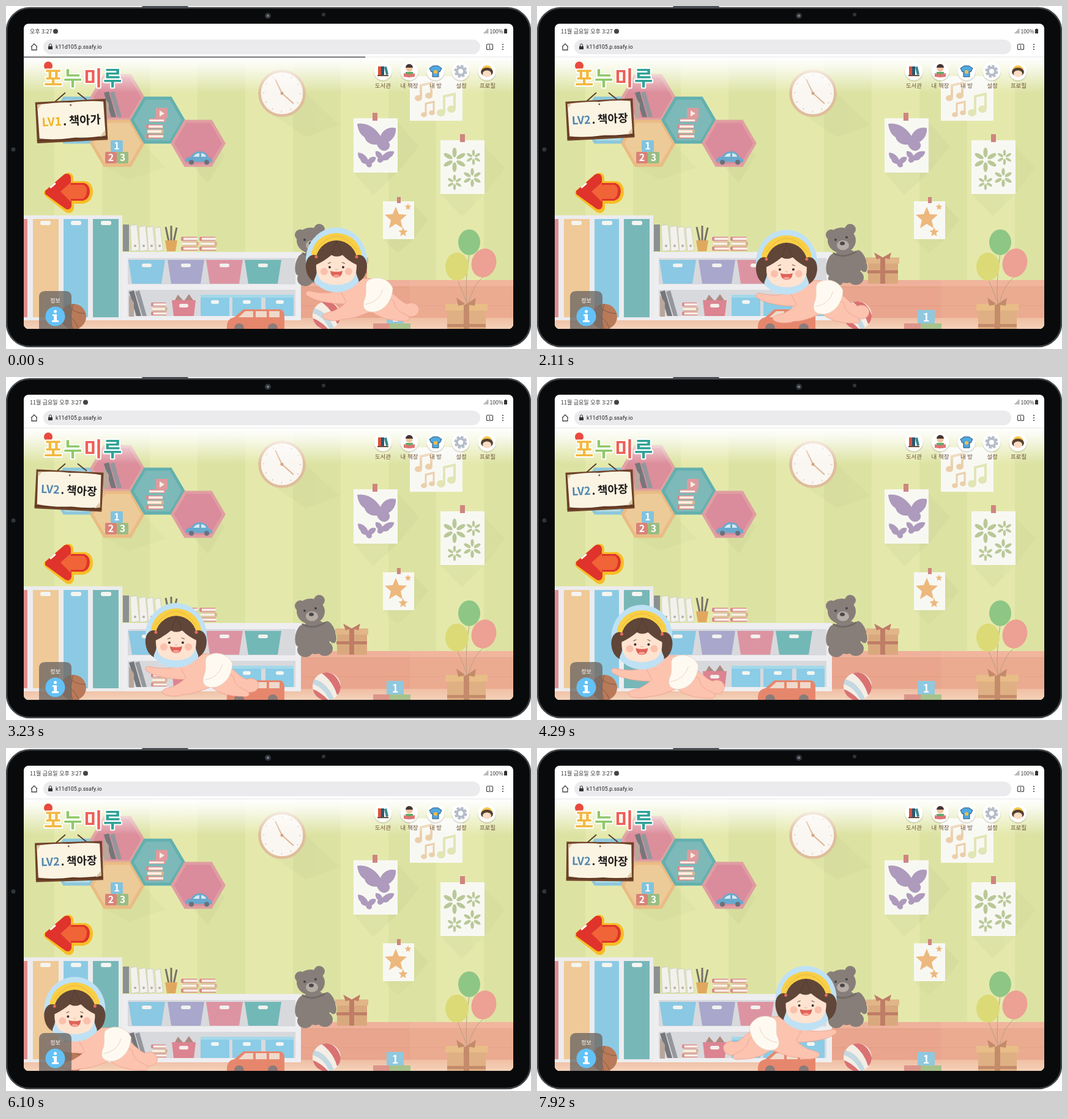
Recreate the animation shown at these times as an HTML page. Size 858 px wide and 562 px high, loop 7.99 s.

```html
<!DOCTYPE html>
<html lang="ko">
<head>
<meta charset="utf-8">
<title>아기 방</title>
<style>
  html, body { margin: 0; width: 100%; height: 100%; overflow: hidden; background: #fff; }
  svg { display: block; width: 100vw; height: 100vh; }
  text { font-family: "Noto Sans CJK KR", "Noto Sans CJK", sans-serif; }
  .menu text { font-size: 9.5px; fill: #6d5236; text-anchor: middle; }
  .brand { font-size: 33px; font-weight: 900; stroke: #fff; stroke-width: 4; paint-order: stroke; stroke-linejoin: round; }
  .board text { font-size: 18px; font-weight: 700; fill: #1d1a18; }
  .skin { fill: #fcc3af; stroke: #ec9f8b; stroke-width: .8; }
</style>
</head>
<body>
<svg viewBox="0 0 858 562" preserveAspectRatio="none">
  <defs>
    <clipPath id="screen"><rect x="29" y="29" width="800" height="500" rx="8"/></clipPath>
    <clipPath id="ballClip"><circle r="23"/></clipPath>
    <linearGradient id="fade" x2="0" y2="1">
      <stop stop-color="#fff"/><stop offset=".25" stop-color="#fff" stop-opacity=".8"/><stop offset="1" stop-color="#fff" stop-opacity="0"/>
    </linearGradient>
    <linearGradient id="floor" x2="0" y2="1"><stop stop-color="#eeb99e"/><stop offset="1" stop-color="#f4d3bb"/></linearGradient>
    <pattern id="stripes" x="235" width="156" height="600" patternUnits="userSpaceOnUse">
      <rect width="156" height="600" fill="#dce3a2"/><rect width="78" height="600" fill="#e4e9ab"/>
    </pattern>
    <path id="hex" d="M-42 0-21-36H21L42 0 21 36H-21Z" stroke-width="5"/>
    <path id="bin" d="M0 0H60L54 39H6Z"/>
    <g id="flower">
      <g id="petals"><ellipse cy="-12" rx="3.5" ry="8"/><ellipse cy="12" rx="3.5" ry="8"/></g>
      <use href="#petals" transform="rotate(60)"/><use href="#petals" transform="rotate(120)"/>
    </g>
    <path id="butterfly" d="M-32-20C-18-23-2-14 6 0 9-8 18-16 31-13 32-3 27 5 19 10 25 16 18 26 10 24 4 22 2 18 0 14-8 15-18 11-20 2-27-2-31-10-32-20Z"/>
    <path id="star" d="M0-18 5-6 18-5 8 4 11 17 0 10-11 17-8 4-18-5-5-6Z"/>
    <g id="stack">
      <rect width="28" height="7" y="18" rx="2" fill="#d98b84"/><rect x="4" width="24" height="4" y="19.500" fill="#f7eee4"/>
      <rect x="2" width="27" height="7" y="10" rx="2" fill="#d9b390"/><rect x="2" width="23" height="4" y="11.500" fill="#f9f1e8"/>
      <rect width="27" height="7" y="2" rx="2" fill="#d98b8f"/><rect x="4" width="23" height="4" y="3.500" fill="#f7eee4"/>
    </g>
    <g id="books">
      <path d="M0 0 8-2 20 40H12Z" fill="#75777b"/><path d="M10 0 17-2 29 40H22Z" fill="#94979c"/><path d="M0 6V41H8V18Z" fill="#b9a79b"/>
    </g>
  </defs>

  <!-- tablet -->
  <rect x="222" width="76" height="5" rx="2" fill="#50545a"/>
  <rect x="1" y="3" width="856" height="555" rx="38" fill="#090a0b" stroke="#43474a" stroke-width="2.500"/>
  <g fill="#303438"><circle cx="428" cy="16" r="5"/><circle cx="519" cy="14" r="3"/><circle cx="12" cy="235" r="3.500"/></g>
  <circle cx="428" cy="16" r="2" fill="#76818e"/>

  <g clip-path="url(#screen)">
    <rect x="29" y="29" width="800" height="500" fill="#fff"/>
    <rect x="29" y="84" width="800" height="445" fill="url(#stripes)"/>

    <!-- wall shelves -->
    <g fill="#000" opacity=".025"><path d="M292 187 358 245 330 290 270 224Z"/><path d="M225 225 260 265 200 285 160 262Z"/><path d="M490 143 545 195 490 215 424 170Z"/></g>
    <use href="#hex" x="116" y="187" fill="#b4dbe3" stroke="#8cc7dc"/>
    <use href="#hex" x="182" y="150" fill="#dc8e9b" stroke="#dfa4a2"/>
    <use href="#hex" x="182" y="225" fill="#edcb98" stroke="#eabb83"/>
    <use href="#hex" x="248" y="187" fill="#7db9b8" stroke="#63b0af"/>
    <use href="#hex" x="314" y="225" fill="#da8b9c" stroke="#e09ea1"/>
    <use href="#books" x="160" y="142"/>
    <use href="#stack" x="229" y="192"/>
    <path d="M234 184h27v6h-27zM245 167h19v17h-19z" fill="#e09a9d"/><path d="M234 186h24v3h-24zM251 171l8 5-8 5z" fill="#f8eee5"/>
    <g font-size="16" font-weight="700" fill="#fff" text-anchor="middle">
      <rect x="171" y="220" width="20" height="19" rx="2" fill="#83c3de"/><rect x="162" y="239" width="19" height="19" rx="2" fill="#d98378"/><rect x="181" y="239" width="19" height="19" rx="2" fill="#99bd83"/>
      <text x="181" y="235">1</text><text x="171.500" y="254">2</text><text x="190.500" y="254">3</text>
    </g>
    <path d="M293 255Q293 247 302 247 307 238 318 238 328 239 331 248 338 249 337 256Z" fill="#69a9cd"/><path d="M306 247Q310 241 316 241V247ZM319 241Q326 242 327 247H319Z" fill="#d5e8ef"/>
    <circle cx="303" cy="256" r="4" fill="#68727c"/><circle cx="328" cy="256" r="4" fill="#68727c"/>

    <!-- clock -->
    <circle cx="451" cy="143" r="36.500" fill="#faf6f1" stroke="#dfbd9c" stroke-width="4.500"/>
    <circle cx="451" cy="143" r="30" fill="none" stroke="#d8cabd" stroke-width="3" stroke-dasharray="1.200 14.508"/>
    <path d="M440 120 451 143 470 160" fill="none" stroke="#dcb595" stroke-width="2"/><circle cx="451" cy="143" r="2.500" fill="#d3a485"/>

    <!-- pictures -->
    <g fill="#000" opacity=".025"><path d="M640 190 675 230 640 273 600 310 568 273Z"/><path d="M782 230 815 265 782 308 745 345 710 308Z"/><path d="M667 325 690 350 667 382 640 405 616 382Z"/></g>
    <g fill="#f8f8f3"><path d="M660 115H746V188H660ZM568 184H640V273H568ZM710 220H782V308H710ZM616 320H667V382H616Z"/></g>
    <g fill="#cf8580"><path d="M599 175h8v13h-8zM742 210h8v13h-8zM639 313h6v10h-6z"/></g>
    <g fill="#ad9abc"><use href="#butterfly" x="606" y="213"/><use href="#butterfly" transform="translate(589 252) scale(.48) rotate(8)"/><use href="#butterfly" transform="translate(618 246) scale(-.48 .48) rotate(-8)"/></g>
    <g fill="none" stroke="#ebcfab" stroke-width="4"><path d="M678 150V130L695 126V146"/><path d="M686 177V160L699 157V174" stroke-width="3"/><path d="M716 174V148L733 144V168" stroke="#e2e5b5"/></g>
    <g fill="#ebcfab"><ellipse cx="674" cy="151" rx="6" ry="5"/><ellipse cx="691" cy="147" rx="6" ry="5"/><ellipse cx="683" cy="178" rx="5" ry="4"/><ellipse cx="696" cy="175" rx="5" ry="4"/></g>
    <g fill="#e2e5b5"><ellipse cx="711" cy="175" rx="7" ry="6"/><ellipse cx="728" cy="169" rx="7" ry="6"/></g>
    <g fill="#b9c898"><use href="#flower" x="733" y="252"/><use href="#flower" transform="translate(764 248) scale(.62)"/><use href="#flower" transform="translate(733 289) scale(.62)"/><use href="#flower" transform="translate(762 281) scale(.78)"/></g>
    <g fill="#edb87d"><use href="#star" x="637" y="347"/><use href="#star" transform="translate(657 329) scale(.3)"/><use href="#star" transform="translate(649 370) scale(.42)"/></g>

    <!-- floor and bench -->
    <rect x="29" y="508" width="800" height="21" fill="url(#floor)"/>
    <rect x="482" y="449" width="347" height="62" fill="#e9a58d"/><rect x="482" y="449" width="347" height="11" fill="#efb19b"/>
    <path d="M482 460H829M482 491H829" stroke="#dc947e" opacity=".6"/>
    <path d="M660 449H829V529H660Z" fill="#f4c5a8" opacity=".15"/>

    <!-- cupboards -->
    <rect x="29" y="343" width="161" height="172" fill="#ececee"/>
    <path d="M29 349h6v161h-6z" fill="#e08d8e"/><path d="M44 349h42v161H44z" fill="#efc997"/><path d="M94 349h40v161H94z" fill="#8ccae4"/><path d="M142 349h42v161h-42z" fill="#78b7b8"/>
    <g fill="#f4f4f0"><rect x="56" y="352" width="17" height="7" rx="3"/><rect x="106" y="352" width="17" height="7" rx="3"/><rect x="155" y="352" width="17" height="7" rx="3"/></g>
    <rect x="190" y="403" width="292" height="112" fill="#eeeef0"/>
    <path d="M199 413H473V456H199zM199 465H473V508H199z" fill="#d8d9dd"/>
    <use href="#bin" x="200" y="416" fill="#8ac8e3"/><use href="#bin" x="264" y="416" fill="#a9a7cb"/><use href="#bin" x="327" y="416" fill="#dd94a2"/><use href="#bin" x="390" y="416" fill="#72b8b7"/>
    <g fill="#f2f2ee"><rect x="222" y="422" width="16" height="6" rx="3"/><rect x="286" y="422" width="16" height="6" rx="3"/><rect x="349" y="422" width="16" height="6" rx="3"/><rect x="412" y="422" width="16" height="6" rx="3"/></g>
    <use href="#books" x="201" y="468"/><use href="#stack" transform="translate(237 484) scale(.92)"/>
    <path d="M271 482h39l-3 26h-33z" fill="#dc8492"/><path d="M276 482l5-9 8 9zM292 482l7-10 7 10z" fill="#ad8b82"/><rect x="283" y="488" width="15" height="6" rx="3" fill="#f6eeea"/>
    <path d="M318 473h47v35h-47zM370 473h47v35h-47zM424 473h46v35h-46z" fill="#8bcce6"/><path d="M318 473h152v5H318z" fill="#a4d8e9"/>
    <g fill="#f3f5f2"><rect x="335" y="482" width="13" height="6" rx="3"/><rect x="387" y="482" width="13" height="6" rx="3"/><rect x="441" y="482" width="13" height="6" rx="3"/></g>

    <!-- things on the cupboard -->
    <g fill="#f2f1eb" stroke="#c9cac3" stroke-width=".8"><path d="M203 360l11-2 4 42-13 2zM217 362l11-2 4 40-13 2zM230 363l10-2 4 39-11 2zM243 364l9-2 5 38-11 2z"/></g>
    <path d="M191 358h10v44h-10z" fill="#8b9092"/><g fill="#b7aca6"><circle cx="211" cy="393" r="2"/><circle cx="225" cy="393" r="2"/><circle cx="238" cy="393" r="2"/><circle cx="251" cy="393" r="2"/></g>
    <path d="M266 386 261 362M270 386V360M274 386 279 363" stroke="#777068" stroke-width="3"/><path d="M260 384h20l-3 18h-14z" fill="#e0a85f"/>
    <use href="#stack" x="286" y="376"/><use href="#stack" x="316" y="376"/>

    <!-- bear and gift -->
    <g fill="#877e79">
      <circle cx="481" cy="375" r="9"/><circle cx="512" cy="366" r="9"/><ellipse cx="498" cy="384" rx="23" ry="21"/><ellipse cx="505" cy="426" rx="25" ry="28"/><ellipse cx="481" cy="424" rx="8" ry="18" transform="rotate(12 481 424)"/><ellipse cx="530" cy="418" rx="8" ry="19" transform="rotate(-20 530 418)"/><ellipse cx="489" cy="447" rx="13" ry="12"/><ellipse cx="521" cy="445" rx="13" ry="12"/>
    </g>
    <ellipse cx="500" cy="392" rx="10" ry="8" fill="#b5aca6"/><ellipse cx="499" cy="389" rx="4" ry="3" fill="#4b484a"/><circle cx="488" cy="383" r="2" fill="#444"/><circle cx="506" cy="379" r="2" fill="#444"/><path d="M484 405Q502 415 522 402" fill="none" stroke="#726a67" stroke-width="3"/>
    <path d="M541 420h49v35h-49z" fill="#d9a97d"/><path d="M538 412h54v10h-54z" fill="#e1b688"/><path d="M561 412h8v43h-8zM540 433h50v5h-50z" fill="#bf7d66"/><path d="M565 412 551 404 555 415ZM565 412 579 404 576 415Z" fill="#bf7d66"/>

    <!-- toys -->
    <path d="M361 529Q360 512 373 510L388 497H447Q455 498 455 507V529Z" fill="#e6876d"/><path d="M380 510 391 500H404V510ZM408 500h18v10h-18zM430 500h17v10h-17z" fill="#efd9cb"/><circle cx="381" cy="528" r="8" fill="#8a7c7a"/><circle cx="436" cy="528" r="8" fill="#8a7c7a"/>
    <g transform="translate(524 507)"><circle r="23" fill="#f4eee5"/><g clip-path="url(#ballClip)"><path d="M-10-23Q18-28 25 8L17 14Q10-10-10-23Z" fill="#da7272"/><path d="M-25 4Q-10 8 4 24H-14Z" fill="#da7272"/><path d="M-22-12Q0-8 12 20L5 23Q-6 0-24-4Z" fill="#c3d8e1"/></g></g>
    <circle cx="110" cy="509" r="21" fill="#b97a59"/><path d="M91 501Q112 510 119 529M100 490Q112 504 130 504M110 488Q103 510 109 530" fill="none" stroke="#7d5a48"/>
    <path d="M622 498h28v24h-28z" fill="#8fc8df"/><path d="M600 520h27v9h-27z" fill="#dc958a"/><path d="M627 520h34v9h-34z" fill="#a7c28c"/><text x="636" y="517" font-size="18" font-weight="700" fill="#fff" text-anchor="middle">1</text>
    <path d="M757 406Q750 450 753 490M738 449 754 488M779 445Q764 455 755 490" fill="none" stroke="#b7a184"/>
    <ellipse cx="737" cy="427" rx="19" ry="23" fill="#dcda76"/><ellipse cx="781" cy="421" rx="20" ry="24" fill="#eda094" transform="rotate(18 781 421)"/><ellipse cx="757" cy="387" rx="18" ry="21" fill="#8ec685"/>
    <path d="M721 497h63v32h-63z" fill="#dfb083"/><path d="M718 488h69v11h-69z" fill="#e8bd87"/><path d="M748 488h9v41h-9zM721 521h63v5h-63zM752 489 736 478 739 491ZM752 489 768 478 766 491Z" fill="#c48b6b"/>

    <rect x="29" y="84" width="800" height="58" fill="url(#fade)"/>

    <!-- swinging level board -->
    <path d="M80 157 97 142M132 154 117 142" stroke="#57402f" stroke-width="2"/>
    <g class="board" id="board">
      <path d="M-55-32H55V32H-55Z" fill="#6f4329"/><path d="M-55 28H55" stroke="#4d2e20"/><path d="M-52-28Q-20-31 0-29 30-31 51-28L52 25Q30 28 5 26-25 29-51 25Z" fill="#fbf4e3"/><path d="M-52-28-45-29-51-21ZM52 25 43 27 51 17Z" fill="#dcc8a2"/><circle cy="-25" r="1.500" fill="#8c5d3c"/>
      <text id="level" x="-46" y="6" font-weight="500"></text><text x="-13.500" y="6">.</text><text id="rank" x="-4" y="6"></text>
    </g>

    <!-- brand -->
    <circle cx="69" cy="98" r="7" fill="#e84a3e"/>
    <g class="brand"><text x="62" y="130" fill="#f3b840">포</text><text x="94" y="130" fill="#8fc869">누</text><text x="127" y="130" fill="#ee5f58">미</text><text x="159" y="130" fill="#2fa297">루</text></g>

    <!-- menu -->
    <g fill="#8a8a70" opacity=".25"><circle cx="616" cy="109" r="15"/><circle cx="659" cy="109" r="15"/><circle cx="702" cy="109" r="15"/><circle cx="743" cy="109" r="15"/><circle cx="786" cy="109" r="15"/></g>
    <g fill="#fff"><circle cx="616" cy="107" r="14.500"/><circle cx="659" cy="107" r="14.500"/><circle cx="702" cy="107" r="14.500"/><circle cx="743" cy="107" r="14.500"/><circle cx="786" cy="107" r="14.500"/></g>
    <path d="M608 99h5v14h-5z" fill="#d9543e"/><path d="M613 99h5v14h-5z" fill="#2b5770"/><path d="M618 100l4-1 3 13-4 1z" fill="#388990"/><path d="M607 113h18v2h-18z" fill="#6d4f3d"/>
    <circle cx="659" cy="102" r="5.500" fill="#f3c3a1"/><path d="M653 101a6 6 0 0 1 12 0Z" fill="#443633"/><path d="M653 108h12v6h-12z" fill="#5aac69"/><path d="M650 110l9 2 9-2v6l-9 1-9-1z" fill="#dd7572"/>
    <path d="M698 98h8l6 4-3 6-2-1v9H697v-9l-2 1-3-6z" fill="#51a8e0" stroke="#275375"/><circle cx="702" cy="108" r="3" fill="#f5bd48"/>
    <circle cx="743" cy="107" r="8" fill="none" stroke="#b5bdc8" stroke-width="5" stroke-dasharray="4 2.283"/><circle cx="743" cy="107" r="6" fill="none" stroke="#b5bdc8" stroke-width="4"/>
    <circle cx="786" cy="106" r="9" fill="#f5c64b"/><ellipse cx="786" cy="108" rx="10" ry="7" fill="#55402f"/><ellipse cx="786" cy="111" rx="7" ry="5.500" fill="#fbdcc5"/>
    <g class="menu"><text x="616" y="134">도서관</text><text x="659" y="134">내 책장</text><text x="702" y="134">내 방</text><text x="744" y="134">설정</text><text x="787" y="134">프로필</text></g>

    <!-- back arrow -->
    <path d="M63 303 96 275Q107 270 110 280V287H130Q142 290 142 305 141 321 126 324H111V332Q108 342 98 338L65 312Q60 308 63 303Z" fill="#f8bd25"/>
    <path d="M64 303 95 276Q104 272 106 281V290H128Q137 293 137 304 136 317 126 319H107V328Q104 336 97 332L64 308Z" fill="#df332c"/>
    <path d="M89 304 106 289V293H127Q133 297 132 304 131 314 125 316H106V321Z" fill="#f06437"/><path d="M73 297 80 291" stroke="#fff" stroke-width="3" stroke-linecap="round"/>

    <!-- crawling baby, centred on the head -->
    <g id="baby">
      <path class="skin" d="M82 48C98 58 106 70 116 72 124 68 133 72 135 80 135 90 128 94 118 93 104 92 94 88 84 82Z"/>
      <path class="skin" d="M20 40C2 56-22 56-43 51-52 50-52 58-45 60-35 67-8 73 18 72Z"/>
      <path class="skin" d="M5 48C25 32 46 27 64 32L66 82C46 87 32 97 12 97-2 102-19 99-22 94-25 87-10 86-3 83 6 78 12 74 16 69Z"/>
      <path class="skin" d="M58 85C70 68 88 60 94 68 95 82 106 86 116 91 123 96 119 102 108 100 90 100 72 96 58 85Z"/>
      <path d="M50 35C62 25 84 28 92 46 92 65 80 82 63 85 46 87 40 77 47 62 50 51 46 43 50 35Z" fill="#fffaf1" stroke="#e8d3c0"/><path d="M47 73Q70 69 76 48" fill="none" stroke="#e8d3c0"/>
      <ellipse rx="50" ry="53" fill="#bfe1f4"/>
      <ellipse cy="-6" rx="41" ry="38" fill="#f9cf46"/><path d="M-33-17Q0-61 33-17" fill="none" stroke="#e8b53a"/>
      <path id="pigtail" d="M-32-7C-42-12-51-2-50 12-49 24-44 32-36 36-38 32-32 27-32 18Z" fill="#604638"/>
      <use href="#pigtail" transform="scale(-1 1)"/>
      <ellipse cy="3" rx="34" ry="35" fill="#604638"/>
      <path d="M-33 8Q-20 2-8-8Q0-3 10-8 20 2 33 8 34 27 22 36 0 46-22 36-34 27-33 8Z" fill="#fee3d0"/>
      <path d="M0-31Q-4-18-8-8M0-31Q6-18 10-8" fill="none" stroke="#4c372e" stroke-width=".7"/>
      <circle cx="-33" cy="-5" r="2.500" fill="#e66a5e"/><circle cx="33" cy="-5" r="2.500" fill="#e66a5e"/>
      <circle cx="-20" cy="19" r="6" fill="#fac0ac"/><circle cx="20" cy="19" r="6" fill="#fac0ac"/>
      <circle cx="-11" cy="12" r="2" fill="#3d302c"/><circle cx="11" cy="12" r="2" fill="#3d302c"/><path d="M-14 6l5-2M14 6 9 4" stroke="#604638"/>
      <path d="M-10 18Q0 21 10 18 9 29 0 29-9 29-10 18Z" fill="#df6258"/><path d="M-6 26Q0 22 6 26 0 31-6 26Z" fill="#f6a095"/><path d="M-2 15q2 2 4 0" fill="none" stroke="#e8a28c"/>
    </g>

    <!-- info button -->
    <path d="M54 529V477Q54 467 64 467H97Q107 467 107 477V529Z" fill="#706a64" opacity=".8"/>
    <text x="80.500" y="486" font-size="9" font-weight="500" fill="#fff" text-anchor="middle">정보</text>
    <circle cx="80.500" cy="508.500" r="16" fill="#63c1f6"/><circle cx="80.500" cy="500.500" r="2.500" fill="#fff"/><path d="M76 505h7v10h3v3H75v-3h3v-7h-2z" fill="#fff"/>

    <!-- browser -->
    <text id="clock" x="39" y="45" font-size="9" fill="#333"></text><circle id="dot" cy="41.500" r="4" fill="#444"/>
    <path d="M781 45v-2h1v2zM783 45v-4h1v4zM785 45v-6h1v6zM787 45v-8h1v8z" fill="#777"/><text x="790.500" y="45" font-size="8.500" fill="#333">100%</text><path d="M814 38h1.500v-1h2v1h1.500v7h-5z" fill="#333"/>
    <path d="M41 67 46 62 51 67M42 66V72H50V66" fill="none" stroke="#444" stroke-width="1.300"/>
    <rect x="61" y="55" width="714" height="24" rx="12" fill="#ebebed"/>
    <path d="M69 66h7v5h-7z" fill="#333"/><path d="M70.500 66v-2a2 2 0 0 1 4 0v2" fill="none" stroke="#333"/>
    <text x="81" y="70" font-size="9" fill="#222" style="font-family:Roboto,sans-serif">k11d105.p.ssafy.io</text>
    <rect x="785.500" y="62.500" width="10" height="9" rx="2" fill="none" stroke="#444" stroke-width="1.200"/><text x="790.500" y="70" font-size="7" text-anchor="middle">1</text>
    <g fill="#444"><circle cx="812" cy="63" r="1.100"/><circle cx="812" cy="67" r="1.100"/><circle cx="812" cy="71" r="1.100"/></g>
    <path d="M29 83.500H829" stroke="#e6e6e6"/><rect id="progress" x="29" y="83" height="1.300" fill="#333"/>
  </g>
</svg>
<script>
const LOOP = 7990, TURN = 6130, LOADED = 950, SWING = 2110;
const byId = id => document.getElementById(id);
const [baby, board, level, rank, clock, dot, progress] =
  ['baby', 'board', 'level', 'rank', 'clock', 'dot', 'progress'].map(byId);

// [time, position] knots, joined by a smooth curve
const leftX = [[0, 540], [1130, 495], [2110, 408], [3230, 278], [4290, 171.5], [5040, 126], [TURN, 112]];
const rightX = [[TURN, 199], [6730, 364], [7570, 426], [LOOP, 442]];
const rightY = [[TURN, 428], [6800, 411.8], [LOOP, 410]];

function curve(knots, t) {
  const last = knots.length - 1;
  let i = 0;
  while (i < last - 1 && t > knots[i + 1][0]) i++;
  const slope = k => {
    const a = knots[Math.max(k - 1, 0)], b = knots[Math.min(k + 1, last)];
    return (b[1] - a[1]) / (b[0] - a[0]);
  };
  const [t0, p0] = knots[i], [t1, p1] = knots[i + 1];
  const d = t1 - t0, u = (t - t0) / d, v = 1 - u;
  return v * v * ((1 + 2 * u) * p0 + u * d * slope(i)) + u * u * ((1 + 2 * v) * p1 - v * d * slope(i + 1));
}

function draw(t) {
  const right = t >= TURN;
  const x = curve(right ? rightX : leftX, t);
  const y = right ? curve(rightY, t) : 428 - (x - 112) * 0.028;
  baby.setAttribute('transform', `translate(${x} ${y}) scale(${right ? -1 : 1} 1)`);

  const first = t < 500;
  const angle = 2.9 * Math.cos((t - 1130) / SWING * 2 * Math.PI);
  board.setAttribute('transform', `translate(${first ? 107 : 103} ${first ? 188.5 : 186}) rotate(${angle}) scale(${first ? 1.05 : 1})`);
  level.textContent = first ? 'LV1' : 'LV2';
  level.style.fill = first ? '#efb51f' : '#4f86b0';
  rank.textContent = first ? '책아가' : '책아장';

  const short = t < 400;
  clock.textContent = short ? '오후 3:27' : '11월 금요일 오후 3:27';
  dot.setAttribute('cx', short ? 81 : 130);
  progress.setAttribute('width', t < LOADED ? Math.min(800, 558 + t * 0.278) : 0);
}

const start = performance.now();
function tick() {
  draw((performance.now() - start) % LOOP);
  requestAnimationFrame(tick);
}
tick();
</script>
</body>
</html>
```
